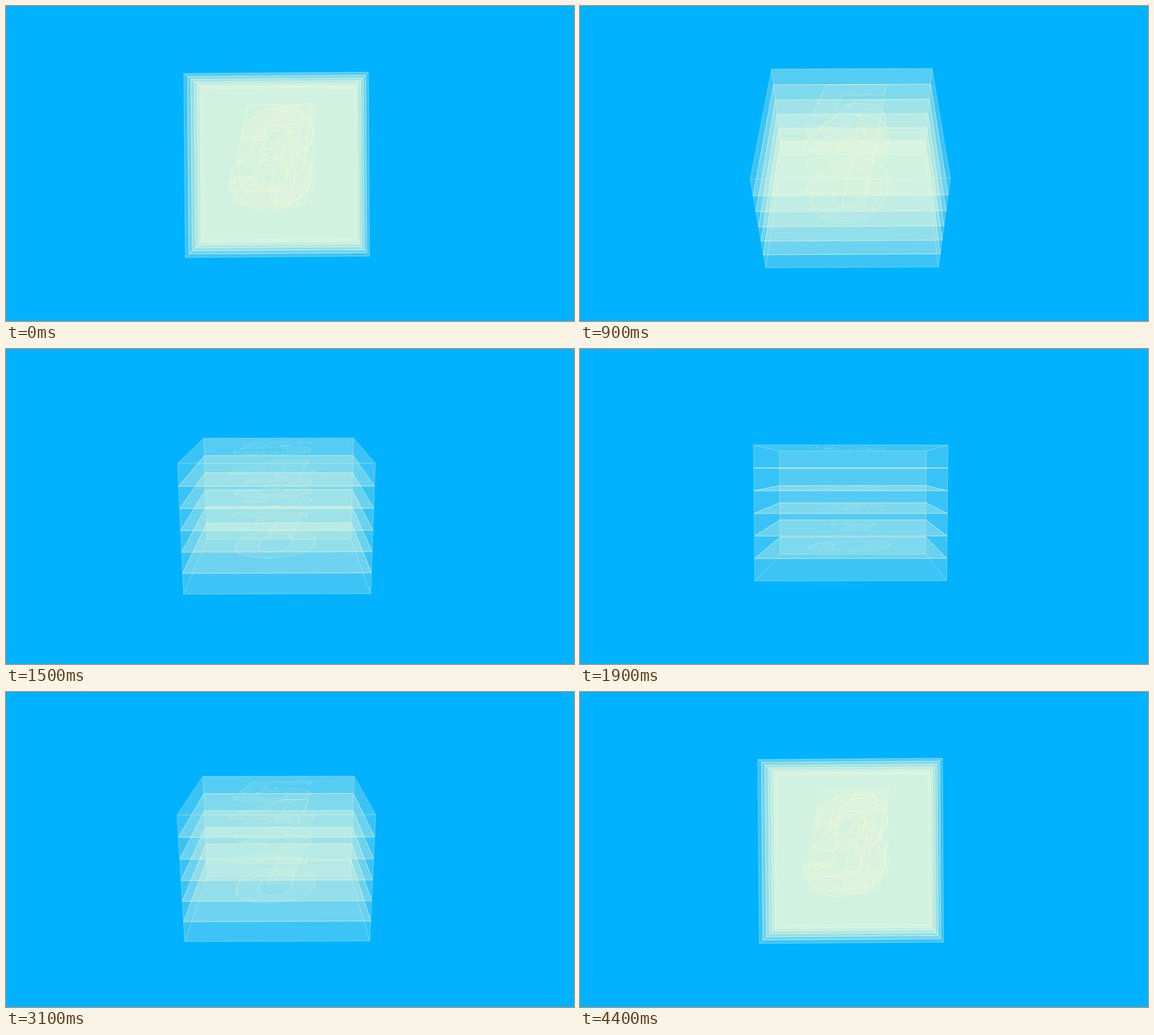
Recreate the animation shown at these times as an HTML page. Size 840 by 467 pixels, loop 4.6 s.

```html
<!DOCTYPE html>
<html lang="en">
<head>
<meta charset="utf-8">
<title>Layer stack</title>
<style>
html, body { margin: 0; width: 100%; height: 100%; overflow: hidden; background: #00b2ff; }
#stage { position: relative; width: 840px; height: 467px; overflow: hidden; }
#stage > * { position: absolute; left: 0; top: 0; }
.digit { width: 0; height: 0; transform-origin: 0 0; }
.digit svg { position: absolute; left: 0; top: 0; overflow: visible; }
polygon {
  fill: rgb(255, 255, 218);
  stroke: rgba(255, 253, 208, .19);
  stroke-width: .9;
  stroke-linejoin: round;
}
text {
  font: 800 192px Inter, "Open Sans", sans-serif;
  text-anchor: middle;
  fill: rgba(255, 255, 218, .06);
  stroke: rgba(255, 253, 208, .4);
  stroke-width: 1.2;
}
</style>
</head>
<body>
<div id="stage"><svg id="faces" width="840" height="467"></svg></div>
<script>
const NS = 'http://www.w3.org/2000/svg';
const LOOP = 4600, STEP = 100, LAYERS = 6;
const HALF = 123, HEIGHT = 174, DEPTH = 887;
const EYE = { x: 419.3, y: 234.8, shift: -17 };
const YAW = 0.4 * Math.PI / 180;
const PLANE = 0.135;
const WALLS = [0.12, 0.11, 0.23, 0.11]; // front, right, back, left

// time in ms, tilt in degrees (90 = seen from above)
const KEYS = [[0, 90.5], [200, 84], [400, 79], [500, 73.5], [600, 66], [900, 42],
  [1000, 36.3], [1200, 26.8], [1400, 18.2], [1500, 13.9], [1700, 7.6], [1800, 5], [1900, 3.6]];

const stage = document.getElementById('stage');
const svg = document.getElementById('faces');

function make(parent, name, attrs = {}) {
  const el = document.createElementNS(NS, name);
  for (const key in attrs) el.setAttribute(key, attrs[key]);
  return parent.appendChild(el);
}

const levelY = i => HEIGHT * (i / LAYERS - 0.5);
const corners = [[-HALF, -HALF], [HALF, -HALF], [HALF, HALF], [-HALF, HALF]];

// Each layer is a closed box, so inner planes lie double.
const faces = [];
function addFace(points, alpha) {
  faces.push({ el: make(svg, 'polygon', { 'fill-opacity': alpha }), points });
}
for (let i = 0; i < LAYERS; i++) {
  const top = levelY(i), bottom = levelY(i + 1);
  for (const y of [top, bottom]) addFace(corners.map(([x, z]) => [x, y, z]), PLANE);
  corners.forEach(([x, z], k) => {
    const [x2, z2] = corners[(k + 1) % 4];
    addFace([[x, top, z], [x2, top, z2], [x2, bottom, z2], [x, bottom, z]], WALLS[k]);
  });
}

const digits = [];
for (let i = 0; i < LAYERS; i++) {
  const el = document.createElement('div');
  el.className = 'digit';
  stage.appendChild(el);
  const box = make(el, 'svg', { width: 1, height: 1 });
  const label = make(box, 'text', { transform: 'translate(-13 59) skewX(-8)' });
  label.textContent = LAYERS - 1 - i;
  digits.push({ el, y: levelY(i) });
}

function tiltAt(ms) {
  let slot = Math.floor((ms % LOOP) / STEP);
  slot = Math.min(slot, LOOP / STEP - 1 - slot);
  if (slot < 4) slot -= slot % 2;
  const t = Math.min(slot * STEP, 1900);
  const n = Math.max(1, KEYS.findIndex(k => k[0] >= t));
  const [t0, a] = KEYS[n - 1], [t1, b] = KEYS[n];
  return a + (b - a) * (t - t0) / (t1 - t0);
}

// Returns a projector giving homogeneous screen coordinates.
function camera(tilt) {
  const c = Math.cos(tilt), s = Math.sin(tilt);
  const cy = Math.cos(YAW), sy = Math.sin(YAW);
  return (x, y, z) => {
    const xr = x * cy - z * sy, zr = z * cy + x * sy;
    const w = 1 + (zr * c + y * s) / DEPTH;
    return [EYE.x * w + xr + EYE.shift, EYE.y * w + y * c - zr * s, w];
  };
}

function draw(ms) {
  const project = camera(tiltAt(ms) * Math.PI / 180);
  for (const { el, points } of faces) {
    el.setAttribute('points', points.map(p => {
      const [x, y, w] = project(...p);
      return (x / w).toFixed(2) + ',' + (y / w).toFixed(2);
    }).join(' '));
  }
  for (const { el, y } of digits) {
    const o = project(0, y, 0);
    const u = project(1, y, 0).map((n, k) => n - o[k]);
    const v = project(0, y, -1).map((n, k) => n - o[k]);
    const m = [u[0], u[1], 0, u[2], v[0], v[1], 0, v[2], 0, 0, 1, 0, o[0], o[1], 0, o[2]];
    el.style.transform = `matrix3d(${m.map(n => n.toFixed(8)).join(',')})`;
  }
}

function tick() {
  draw(performance.now());
  requestAnimationFrame(tick);
}
tick();
</script>
</body>
</html>
```
